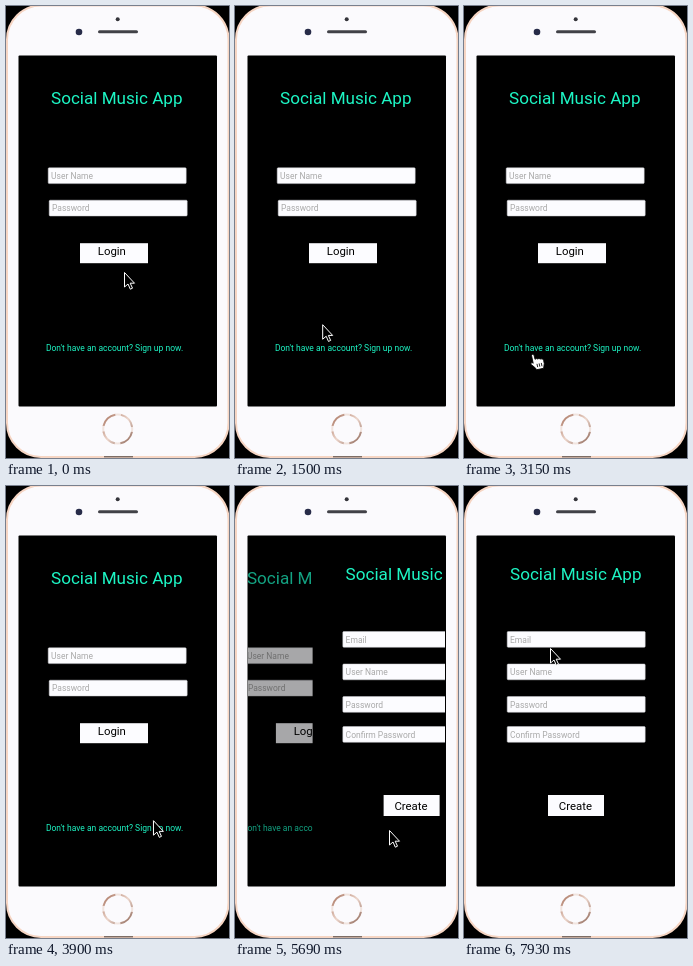
An HTML page for the animation above (8000 ms loop, 223 by 452 pixels).

```html
<!DOCTYPE html>
<html lang="en">
<head>
<meta charset="utf-8">
<title>Login and sign-up prototype</title>
<style>
html, body { margin: 0; width: 100%; height: 100%; overflow: hidden; background: #000; }
svg { display: block; width: 223px; height: 452px; font-family: Roboto, Arial, sans-serif; }
.title { font-size: 17.1px; fill: #1df5c4; }
.link { font-size: 8.52px; fill: #1df5c4; }
.hint { font-size: 8.5px; fill: #a9a9a9; }
.label { font-size: 11.4px; fill: #000; }
.field { fill: #fcfcff; stroke: #c9cbcf; stroke-width: .5; }
.button { fill: #fcfcff; }
</style>
</head>
<body>
<svg viewBox="0 0 223 452">
  <defs>
    <linearGradient id="ring" x1="0" y1="0" x2="1" y2="1">
      <stop offset="0" stop-color="#a5705c"/>
      <stop offset=".5" stop-color="#ecd5cb"/>
      <stop offset="1" stop-color="#8a6355"/>
    </linearGradient>
    <clipPath id="screen"><rect x="13" y="50" width="197" height="350"/></clipPath>
  </defs>

  <rect width="223" height="452"/>
  <path d="M.5 85v10M.5 114v9M.5 142v8" stroke="#d9b4a2"/>
  <rect x="1" y="-.5" width="221.500" height="451.500" rx="34" fill="#fbfafd" stroke="#f6d5c3" stroke-width="2"/>
  <path d="M98 450.800h29" stroke="#4b403c"/>
  <circle cx="111.700" cy="13.300" r="2" fill="#34343a"/>
  <circle cx="73" cy="26" r="3.300" fill="#272b48"/>
  <rect x="92" y="24.300" width="40" height="3" rx="1.500" fill="#414147"/>
  <g fill="none" stroke-width="2">
    <circle cx="111.700" cy="423" r="14.500" stroke="#f1e4df"/>
    <circle cx="111.700" cy="423" r="14.500" stroke="url(#ring)" stroke-dasharray="17 5.780" stroke-dashoffset="-2.900"/>
  </g>
  <rect x="12.500" y="49.500" width="198.500" height="351" rx="1"/>

  <g clip-path="url(#screen)">
    <g id="login"></g>
    <g id="signup"></g>
  </g>
  <path id="arrow" d="M.5.5V15L4 12 6.300 17.200 8.500 16.200 6.200 11.200H10.500Z" fill="#000" stroke="#fff"/>
  <g id="hand" stroke="#000" stroke-width=".8" stroke-linejoin="round">
    <g transform="rotate(-12 7 9)">
      <path d="M3 1.500Q4.300-.3 5.600 1.500V6Q7 4.800 8.300 6.200 9.700 5.400 10.900 6.800 13.500 6.200 13.800 8.700V12L12.200 16.500H5.200L3.600 13.600.6 10.200Q.2 8 2.200 8.600L3 9.500Z" fill="#fff"/>
      <path d="M6.600 10.800v3.400M8.800 10.800v3.400M11 10.800v3.400" fill="none"/>
    </g>
  </g>
</svg>
<script>
const LOOP = 8000, STEP = 149.6, WIDTH = 197;
const $ = id => document.getElementById(id);
const clamp = v => Math.min(1, Math.max(0, v));

const text = (cls, x, y, s) => `<text class="${cls}" x="${x}" y="${y}">${s}</text>`;
const field = (x, y, hint) =>
  `<rect class="field" x="${x}" y="${y}" width="138" height="15.800" rx="1"/>` + text('hint', x + 2.8, y + 11.2, hint);
const button = (x, y, w, h, label, tx, ty) =>
  `<rect class="button" x="${x}" y="${y}" width="${w}" height="${h}"/>` + text('label', tx, ty, label);

$('login').innerHTML =
  text('title', 45, 97.7, 'Social Music App') +
  field(42.2, 161.8, 'User Name') + field(43.2, 194.2, 'Password') +
  button(74, 237.2, 68, 20, 'Login', 91.8, 249) +
  text('link', 39.9, 344.7, "Don't have an account? Sign up now.");

$('signup').innerHTML =
  '<rect x="13" y="50" width="197" height="350"/>' +
  text('title', 46, 94, 'Social Music App') +
  field(43.2, 145.5, 'Email') + field(43.2, 178, 'User Name') +
  field(43.2, 210.5, 'Password') + field(43.2, 240.5, 'Confirm Password') +
  button(84, 309, 56, 21, 'Create', 94.8, 324.4);

// Pointer moves: first and last step, two control points, end point
const start = [118, 266];
const moves = [
  { from: 0, to: 6, curve: [[170, 220], [195, 335], [120, 326]] },
  { from: 7, to: 14, curve: [[84, 300], [70, 330], [95, 350]] },
  { from: 14, to: 21, curve: [[83, 327], [0, 350], [70, 346]] },
  { from: 21, to: 28, curve: [[90, 345], [168, 321], [154, 344]] },
  { from: 45, to: 50, curve: [[90, 245], [100, 155], [84, 155]] },
  { from: 52, to: 53, curve: [[84, 155], [86, 162], [86, 162]] }
];

const bezier = (k, a, b, c, d) =>
  a.map((v, i) => (1 - k) ** 3 * v + 3 * k * (1 - k) ** 2 * b[i] + 3 * k * k * (1 - k) * c[i] + k ** 3 * d[i]);

const pointerAt = step => moves.reduce(
  (pos, { from, to, curve }) => bezier(clamp((step - from) / (to - from)), pos, ...curve)
    .map((v, i) => step > from ? v : pos[i]), start);

const move = (el, x, y) => el.setAttribute('transform', `translate(${x} ${y})`);
const show = (el, on) => el.setAttribute('visibility', on ? 'visible' : 'hidden');

function draw(now) {
  const step = Math.floor(now % LOOP / STEP);

  // The new page slides over the old one, which drifts left and dims
  const push = clamp((step - 36.6) * .48);
  move($('login'), -WIDTH / 4 * push, 0);
  $('login').setAttribute('opacity', 1 - push / 2);
  move($('signup'), WIDTH * (1 - push), 0);

  const [x, y] = pointerAt(step);
  const overLink = y > 336 && step < 33;
  show($('arrow'), !overLink);
  show($('hand'), overLink);
  move($('arrow'), x, y);
  move($('hand'), x - 4, y + 1);
  requestAnimationFrame(draw);
}
draw(0);
</script>
</body>
</html>
```
